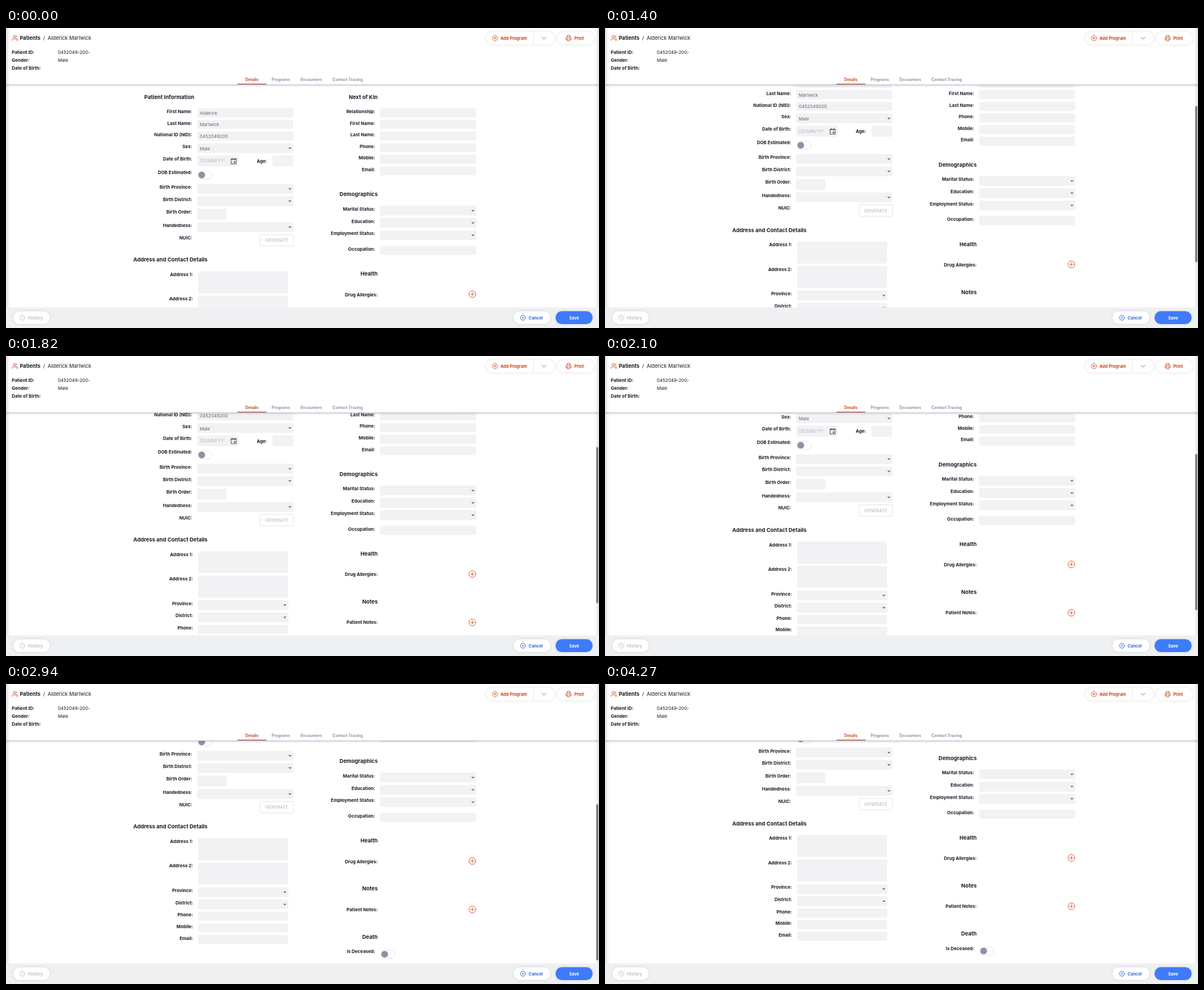
Recreate the animation shown at these times as an HTML page. Size 1053 by 532 pixels, loop 4.69 s.

```html
<!DOCTYPE html>
<html lang="en">
<head>
<meta charset="utf-8">
<title>Patient details</title>
<style>
  @property --scroll { syntax: "<number>"; inherits: true; initial-value: 0; }

  html, body { margin: 0; width: 100%; height: 100%; overflow: hidden; background: #fff; }
  svg { display: block; width: 100%; height: 100%; animation: scroll 4690ms step-end infinite; }
  #form { transform: translateY(calc(var(--scroll) * -1px)); }
  #thumb { transform: translateY(calc(var(--scroll) * .711px)); animation: thumb 4690ms step-end infinite; }

  text { font-family: Inter, sans-serif; font-size: 8.05px; fill: #1c1c28; white-space: pre; }
  .label { font-size: 8px; font-weight: 700; }
  .heading { font-size: 9.5px; font-weight: 700; }
  .value { fill: #68686f; }
  .hint { fill: #b9b9c0; }
  .crumb { font-size: 9.2px; }
  .tab { font-size: 6.9px; font-weight: 700; fill: #8f90a6; text-anchor: middle; }
  .button { font-size: 7.4px; font-weight: 700; }
  .generate { font-size: 7.5px; font-weight: 500; letter-spacing: .2px; fill: #bcbcc2; text-anchor: middle; }
  .end { text-anchor: end; }
  .middle { text-anchor: middle; }
  .bold { font-weight: 700; }
  .orange { fill: #c9481f; }
  .blue { fill: #3568d4; }
  .faded { fill: #c3c3ca; }

  .field { fill: #f2f2f4; }
  .arrow { fill: #717178; }
  .pill { fill: #fff; filter: drop-shadow(0 .6px 1.6px rgba(40, 41, 61, .22)); }
  .line { fill: none; stroke-width: 1; stroke-linecap: round; stroke-linejoin: round; }
  .line.orange { fill: none; stroke: #d2552e; }
  .line.blue { fill: none; stroke: #3568d4; }
  .line.faded { fill: none; stroke: #c3c3ca; }

  @keyframes scroll {
    0% { --scroll: 0; }
    10.447% { --scroll: 4; }
    11.940% { --scroll: 14; }
    13.432% { --scroll: 28; }
    14.925% { --scroll: 41.2; }
    16.417% { --scroll: 48.5; }
    17.910% { --scroll: 51.5; }
    29.850% { --scroll: 52.7; }
    31.343% { --scroll: 55; }
    32.835% { --scroll: 59; }
    34.328% { --scroll: 64.5; }
    35.820% { --scroll: 71; }
    37.313% { --scroll: 78.5; }
    38.805% { --scroll: 85.3; }
    40.298% { --scroll: 91; }
    41.791% { --scroll: 96; }
    43.283% { --scroll: 100; }
    44.776% { --scroll: 102.5; }
    55.223% { --scroll: 107; }
    56.716% { --scroll: 117; }
    58.208% { --scroll: 129.8; }
    59.701% { --scroll: 142; }
    61.194% { --scroll: 151.5; }
    62.686% { --scroll: 158; }
    64.179% { --scroll: 161.5; }
    71.641% { --scroll: 163; }
    73.134% { --scroll: 164.2; }
    91.044%, 100% { --scroll: 163.6; }
  }
  @keyframes thumb {
    0% { opacity: 0; }
    10.447% { opacity: 1; }
    91.044%, 100% { opacity: 0; }
  }
</style>
</head>
<body>
<svg viewBox="0 0 1053 532">
  <defs>
    <linearGradient id="edge">
      <stop offset="0" stop-color="#1c1c28" stop-opacity=".15"/>
      <stop offset=".5" stop-color="#1c1c28" stop-opacity=".05"/>
      <stop offset="1" stop-color="#1c1c28" stop-opacity="0"/>
    </linearGradient>
    <linearGradient id="under" x2="0" y2="1">
      <stop offset="0" stop-color="#1c1c28" stop-opacity=".14"/>
      <stop offset="1" stop-color="#1c1c28" stop-opacity="0"/>
    </linearGradient>
    <clipPath id="dateClip"><rect x="340" y="226" width="48.3" height="20"/></clipPath>
  </defs>

  <g id="form"></g>

  <rect width="1053" height="100" fill="#fff"/>
  <rect y="100" width="1053" height="1" fill="#c6c6cd"/>
  <rect y="101" width="1053" height="4" fill="url(#under)"/>
  <rect x="411" y="98.8" width="51.5" height="1.3" fill="#9c4a45"/>
  <rect width="8" height="496" fill="url(#edge)"/>
  <rect width="8" height="496" fill="url(#edge)" transform="matrix(-1 0 0 1 1053 0)"/>
  <rect id="thumb" x="1048" y="100.8" width="3.8" height="277" rx="1.9" fill="#7d7d80"/>
  <rect y="495.5" width="1053" height="36.5" fill="#eff0f2"/>

  <g id="chrome">
    <g class="line orange">
      <circle cx="14.8" cy="15.4" r="2.1"/>
      <path d="M11 22.3v-1a2.2 2.2 0 0 1 2.2-2.2h3.2a2.2 2.2 0 0 1 2.2 2.2v1M18 13.4a2.1 2.1 0 0 1 0 4M21 22.3v-1a2.2 2.2 0 0 0-1.6-2.1"/>
    </g>
    <rect class="pill" x="852.5" y="6" width="121.5" height="23.7" rx="11.8"/>
    <path d="M936.5 6v23.7" stroke="#e6e6ea"/>
    <path class="line orange" d="M951.6 16.2l3.6 3.5 3.6-3.5"/>
    <rect class="pill" x="978" y="6" width="66" height="23.7" rx="11.8"/>
    <path class="line orange" d="M996.7 16v-3h4.6v3M996.7 20.6h-2v-4.4h8.6v4.4h-2M996.7 19h4.6v3.6h-4.6z"/>
    <rect class="pill" x="13" y="502.3" width="65" height="22.7" rx="11.3"/>
    <g class="line faded"><circle cx="29" cy="513.8" r="4.5"/><path d="M29 511v2.8l1.8 1"/></g>
    <rect class="pill" x="901" y="502.3" width="66" height="22.7" rx="11.3"/>
    <g class="line blue"><circle cx="918" cy="513.8" r="4.4"/><path d="M916.6 512.4l2.8 2.8m0-2.8l-2.8 2.8"/></g>
    <rect class="pill" x="976" y="502.3" width="65.5" height="22.7" rx="11.3" style="fill:#3e7bfa"/>
  </g>
</svg>
<script>
const form = document.getElementById("form");
const chrome = document.getElementById("chrome");

function add(parent, tag, attrs, content = "") {
  const node = document.createElementNS("http://www.w3.org/2000/svg", tag);
  for (const key in attrs) node.setAttribute(key, attrs[key]);
  node.textContent = content;
  return parent.appendChild(node);
}

// Text is placed by the vertical middle of its capitals.
function text(parent, x, middle, content, type) {
  const node = add(parent, "text", { x, class: type }, content);
  const size = parseFloat(getComputedStyle(node).fontSize);
  node.setAttribute("y", middle + size * 0.364);
  return node;
}

const label = (right, y, content) => text(form, right, y, content, "label end");
const field = (x, y, width, height = 16) =>
  add(form, "rect", { x, y, width, height, rx: 3, class: "field" });

function select(x, y, width) {
  field(x, y, width, 17.5);
  add(form, "path", { d: `M${x + width - 9.4} ${y + 7.6}h6l-3 3z`, class: "arrow" });
}

function toggle(x, middle) {
  add(form, "rect", { x: x + .5, y: middle - 7.2, width: 25.6, height: 14.4, rx: 7.2, fill: "#fff", stroke: "#dddde3", "stroke-width": .8 });
  add(form, "circle", { cx: x + 7.6, cy: middle, r: 6, fill: "#8f90a6" });
}

function plus(parent, x, y, radius, arm) {
  add(parent, "circle", { cx: x, cy: y, r: radius, class: "line orange" });
  add(parent, "path", { d: `M${x - arm} ${y}h${2 * arm}M${x} ${y - arm}v${2 * arm}`, class: "line orange" });
}

function inputs(names, right, x, y, width) {
  names.forEach((name, i) => {
    label(right, y + 5.7 + i * 20.55, name);
    field(x, y + i * 20.55, width);
  });
}

function selects(names, right, x, y, width) {
  names.forEach((name, i) => {
    label(right, y + 5.8 + i * 21.75, name);
    select(x, y + i * 21.75, width);
  });
}

text(form, 290, 122.6, "Patient Information", "heading middle");
inputs(["First Name:", "Last Name:", "National ID (NID):"], 330.5, 339.5, 142.5, 170.5);
["Alderick", "Marlwick", "0452049200"].forEach((value, i) =>
  text(form, 344, 150.8 + i * 20.5, value, "value"));
selects(["Sex:"], 330.5, 339.5, 204.3, 171);
text(form, 344, 213.9, "Male", "value");

label(330.5, 231.8, "Date of Birth:");
field(339.5, 226, 73.5, 19.4);
text(form, 344, 235.4, "DD/MM/YYYY", "hint").setAttribute("clip-path", "url(#dateClip)");
add(form, "path", { d: "M399.6 232.2h9.2v8.6h-9.2zM399.6 233.2h9.2M401.6 230.4v1.6M406.8 230.4v1.6", fill: "none", stroke: "#65656c", "stroke-width": 1.2 });
add(form, "rect", { x: 404.4, y: 236.4, width: 2.8, height: 2.8, fill: "#65656c" });
label(463.5, 236, "Age:");
field(473, 226, 37, 19.4);
label(330.5, 255.8, "DOB Estimated:");
toggle(340, 260.8);

selects(["Birth Province:", "Birth District:"], 330.5, 339.5, 276.4, 171);
label(330.5, 326.2, "Birth Order:");
field(339.5, 320.2, 52, 19.6);
selects(["Handedness:"], 330.5, 339.5, 344.3, 171);
label(330.5, 372, "NUIC:");
add(form, "rect", { x: 451.3, y: 366.3, width: 59.4, height: 20.2, rx: 1.5, fill: "#fff", stroke: "#dcdce0", "stroke-width": .8 });
text(form, 481, 376.5, "GENERATE", "generate");

text(form, 292, 411, "Address and Contact Details", "heading middle");
["Address 1:", "Address 2:"].forEach((name, i) => {
  label(332, 437.1 + i * 43.4, name);
  field(341, 431.4 + i * 43.4, 160, 39);
});
selects(["Province:", "District:"], 332, 341, 518.3, 160.5);
inputs(["Phone:", "Mobile:", "Email:"], 332, 341, 561.8, 160);

const rightHeadings = {
  "Next of Kin": 122.6, "Demographics": 294.8, "Health": 435.8, "Notes": 520.9, "Death": 606.5
};
for (const name in rightHeadings) text(form, 660, rightHeadings[name], name, "heading end");
inputs(["Relationship:", "First Name:", "Last Name:", "Phone:", "Mobile:", "Email:"], 655.5, 664.3, 142.5, 170.5);
selects(["Marital Status:", "Education:", "Employment Status:"], 655.5, 664.3, 315.1, 171.2);
inputs(["Occupation:"], 655.5, 664.3, 386.3, 170.5);
label(660, 472.6, "Drug Allergies:");
plus(form, 828.2, 472, 6, 3);
label(660, 557.9, "Patient Notes:");
plus(form, 828.2, 557.8, 6, 3);
label(655.5, 632.2, "Is Deceased:");
toggle(664.8, 637.2);

text(chrome, 24.5, 17.5, "Patients", "crumb bold");
text(chrome, 66, 17.5, "/", "crumb");
text(chrome, 74, 17.5, "Alderick Marlwick", "crumb");
[["Patient ID:", "0452049-200-"], ["Gender:", "Male"], ["Date of Birth:", ""]].forEach(([name, value], i) => {
  text(chrome, 10.3, 43.1 + i * 13.75, name, "label");
  text(chrome, 92, 43.1 + i * 13.75, value, "");
});
text(chrome, 436.7, 91, "Details", "tab").style.fill = "#c9481f";
text(chrome, 488, 91, "Programs", "tab");
text(chrome, 542.2, 91, "Encounters", "tab");
text(chrome, 606.8, 91, "Contact Tracing", "tab");
plus(chrome, 868.3, 17.9, 4.5, 2);
text(chrome, 878, 18, "Add Program", "button orange");
text(chrome, 1009, 18, "Print", "button orange");
text(chrome, 39, 514, "History", "button faded");
text(chrome, 928, 514, "Cancel", "button blue");
text(chrome, 1008.8, 514, "Save", "button middle").style.fill = "#fff";
</script>
</body>
</html>
```
